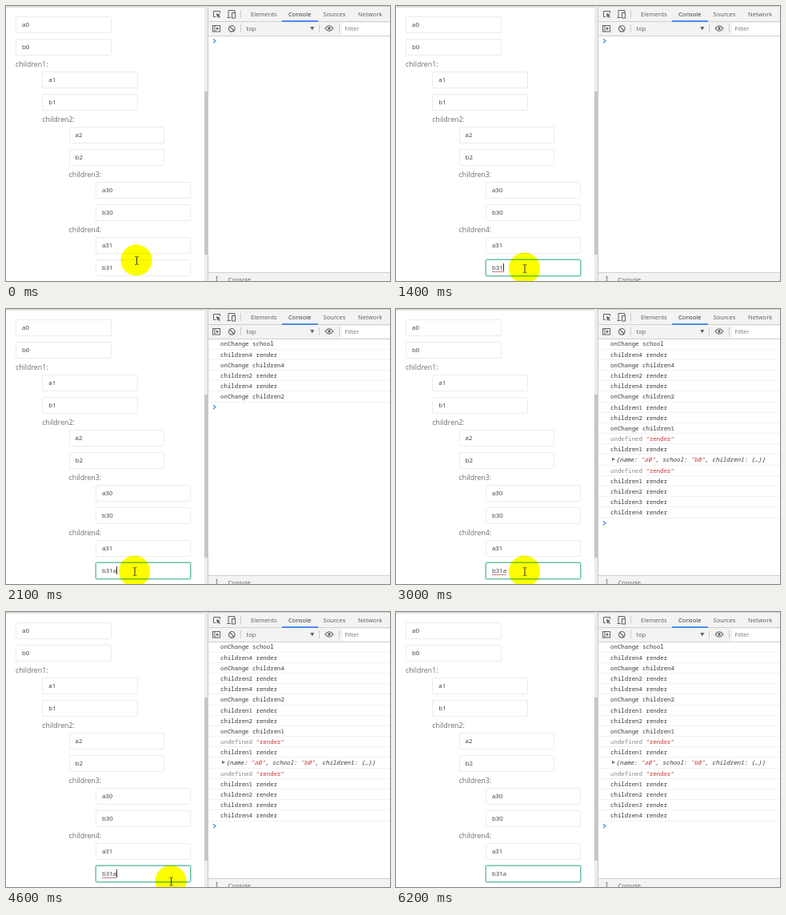
These frames come from a looping animation (480 px wide and 344 px high, 6300 ms). An HTML page:

```html
<!DOCTYPE html>
<html lang="en">
<head>
<meta charset="utf-8">
<title>Nested form with console</title>
<style>
  html, body { margin: 0; width: 100%; height: 100%; overflow: hidden; background: #fff; }
  #stage { position: relative; width: 480px; height: 344px; overflow: hidden; font-family: "Open Sans", "Noto Sans", sans-serif; }
  #stage > * { position: absolute; }
  svg { left: 0; top: 0; overflow: visible; }
  .label { font-size: 8.8px; line-height: 14px; color: #6c6c6c; white-space: nowrap; }
  .field {
    box-sizing: border-box; width: 119.5px; height: 21px; padding-left: 7px;
    border: 1px solid #ececec; border-radius: 2px;
    font-size: 7.9px; line-height: 19px; color: #3c3c3c; white-space: nowrap;
  }
  .ui { font-size: 7.6px; fill: #5a5a5a; }

  .log { left: 253px; top: 37.4px; width: 227px; font: 7.42px/12.2px "Noto Sans Mono", "DejaVu Sans Mono", monospace; color: #383838; }
  .rows { height: 0; overflow: hidden; }
  .row { box-sizing: border-box; height: 13.2px; padding-left: 15px; border-bottom: 1px solid #f2f2f2; white-space: pre; }
  .row b { font-weight: 400; color: #c8322e; }
  .row u { text-decoration: none; color: #8a8a8a; }
  .object { position: relative; padding-left: 22px; font-style: italic; }
  .object::before {
    content: ""; position: absolute; left: 17px; top: 4px;
    border: solid transparent; border-width: 2.5px 0 2.5px 4px; border-left-color: #6e6e6e;
  }
  .prompt { display: block; margin: 3.4px 0 0 5px; overflow: visible; }

  /* Every part shares one loop and changes in hard steps. */
  .active, .tail, .caret, .squiggle, .pointer, .rows { animation: 6.3s step-end infinite; }
  .active { animation-name: focus; }
  .tail { animation-name: type; }
  .caret { animation-name: blink; display: inline-block; width: 1px; height: 10px; margin-right: -1px; vertical-align: -2px; background: #333; }
  .word { position: relative; display: inline-block; line-height: 19px; }
  .squiggle { animation-name: spell; position: absolute; left: 0; right: 0; top: 14px; height: 1px; background: repeating-linear-gradient(90deg, #b8605c 0 1.3px, #d09c98 1.3px 2px); }
  .pointer { animation-name: move; mix-blend-mode: multiply; }
  .rows { animation-name: print; }

  @keyframes focus {
    0% { border-color: #ececec; box-shadow: none; }
    1.58% { border-color: #b9ddd3; box-shadow: none; }
    3.17% { border-color: #8fcfbe; box-shadow: none; }
    4.76% { border-color: #6cc2ac; box-shadow: none; }
    6.34% { border-color: #6cc2ac; box-shadow: 0 0 0 .5px #57bda233; }
    7.93% { border-color: #6cc2ac; box-shadow: 0 0 0 1px #57bda255; }
    9.52%, 100% { border-color: #6cc2ac; box-shadow: 0 0 0 1px #57bda277; }
  }
  @keyframes type {
    0% { display: none; }
    30.15%, 100% { display: inline; }
  }
  @keyframes blink {
    0%, 12.69%, 47.61%, 65.07%, 82.53%, 98.41%, 100% { opacity: 0; }
    6.34%, 22.22%, 57.14%, 73.01%, 90.47% { opacity: 1; }
  }
  @keyframes spell {
    0%, 30.15%, 98.41%, 100% { opacity: 0; }
    11.11%, 39.68% { opacity: 1; }
  }
  @keyframes move {
    0% { transform: translate(163px, 318px); }
    1.58% { transform: translate(162px, 323px); }
    3.17% { transform: translate(161px, 327px); }
    4.76% { transform: translate(160.5px, 328px); }
    73.01% { transform: translate(206px, 336.5px); }
    74.6% { transform: translate(222px, 350px); }
    76.19%, 100% { transform: translate(240px, 380px); }
  }
  @keyframes print {
    0% { height: 0; }
    31.74% { height: 39.6px; }
    33.33% { height: 79.2px; }
    34.92% { height: 118.8px; }
    36.5% { height: 158.4px; }
    38.09%, 100% { height: 224.4px; }
  }
</style>
</head>
<body>
<div id="stage">
  <svg width="480" height="344">
    <path d="M0 1H248" stroke="#d4d4d4" stroke-width="1.5"/>
    <rect x="248" width="4" height="344" fill="#ececec"/>
    <rect x="248" y="107" width="4" height="204" fill="#c6c6c6"/>
    <path d="M252.5 0V344" stroke="#cacaca"/>
    <rect x="253" width="227" height="37" fill="#f3f3f3"/>
    <path d="M253 .5H480M253 19.5H480M253 37.5H480" stroke="#d0d0d0"/>
    <path d="M345 19H390" stroke="#4a8cf0" stroke-width="2"/>
    <path d="M293.5 5V15M293.5 23V33M391.5 23V33M416.5 23V33" stroke="#ccc"/>
    <rect x="420" y="21" width="60" height="15.5" fill="#fff"/>

    <g fill="none" stroke="#606060">
      <path d="M262 13.5H259.5V6.5H267.5V9"/>
      <path d="M263 9l5 2-2 1 2 2-1 1-2-2-1 2z" fill="#606060" stroke="none"/>
      <path d="M278 14.5V5.5H286V8M276.5 14.5H281"/>
      <rect x="282.5" y="8.5" width="4" height="6.5"/>
      <rect x="258.5" y="24.5" width="9" height="7.5"/>
      <path d="M261 24.5V32"/>
      <path d="M263 26.2L266.2 28.2 263 30.3z" fill="#606060" stroke="none"/>
      <circle cx="282.3" cy="28.3" r="3.8" stroke-width="1.2"/>
      <path d="M279.7 25.6L285 31" stroke-width="1.2"/>
      <path d="M399 28Q404 21.5 409 28Q404 34.5 399 28Z" stroke-width="1.2"/>
      <circle cx="404" cy="28" r="1.7" fill="#606060" stroke="none"/>
      <path d="M380.3 26H385.3L382.8 30.2z" fill="#606060" stroke="none"/>
    </g>

    <g class="ui">
      <text x="306" y="13">Elements</text>
      <text x="353" y="13" fill="#303030">Console</text>
      <text x="396.5" y="13">Sources</text>
      <text x="440" y="13">Network</text>
      <text x="300.5" y="31">top</text>
      <text x="423.5" y="31.3" fill="#777">Filter</text>
    </g>

    <rect x="253" y="333" width="227" height="11" fill="#f3f3f3"/>
    <path d="M253 333.5H480" stroke="#cfcfcf"/>
    <path d="M263.5 338v1.5m0 1v1.5m0 1v1" stroke="#606060" stroke-width="1.5"/>
    <text class="ui" x="277.5" y="344.6">Console</text>
  </svg>

  <div class="log">
    <div class="rows"></div>
    <svg class="prompt" width="6" height="6"><path d="M1 .3L4 2.8 1 5.3" fill="none" stroke="#4a86e8" stroke-width="1.2"/></svg>
  </div>

  <svg class="pointer" width="1" height="1">
    <circle r="19.6" fill="#fdfd00"/>
    <path d="M-1.5-4.5Q.5-4.5 .5-3.5V4.5Q.5 5.5-1.5 5.5M2.5-4.5Q.5-4.5 .5-3.5M.5 4.5Q.5 5.5 2.5 5.5" fill="none" stroke="#333"/>
  </svg>
</div>
<script>
  const stage = document.getElementById('stage');
  const pointer = document.querySelector('.pointer');

  function place(className, x, y, html) {
    const el = document.createElement('div');
    el.className = className;
    el.style.left = x + 'px';
    el.style.top = y + 'px';
    el.innerHTML = html;
    stage.insertBefore(el, pointer);
  }

  // Each group is an optional heading followed by two fields.
  const suffixes = ['0', '1', '2', '30', '31'];
  const indent = 33.3;
  suffixes.forEach((suffix, i) => {
    const x = 12 + indent * Math.min(i, 3);
    const y = 13.3 + 69 * i;
    const last = i === suffixes.length - 1;
    if (i) place('label', x - indent, y - 16.3, `children${i}:`);
    place('field', x, y, 'a' + suffix);
    place(last ? 'field active' : 'field', x, y + 27.6, last
      ? '<span class="word">b31<span class="tail">a</span><i class="squiggle"></i></span><i class="caret"></i>'
      : 'b' + suffix);
  });

  const render = n => `children${n} render`;
  const change = name => `onChange ${name}`;
  const root = '<u>undefined</u> <b>"render"</b>';
  const object = '{name: <b>"a0"</b>, school: <b>"b0"</b>, children1: {…}}';
  const lines = [
    change('school'), render(4), change('children4'),
    render(2), render(4), change('children2'),
    render(1), render(2), change('children1'),
    root, render(1), object,
    root, render(1), render(2), render(3), render(4)
  ];
  document.querySelector('.rows').innerHTML = lines
    .map(line => `<div class="row${line === object ? ' object' : ''}">${line}</div>`)
    .join('');
</script>
</body>
</html>
```
